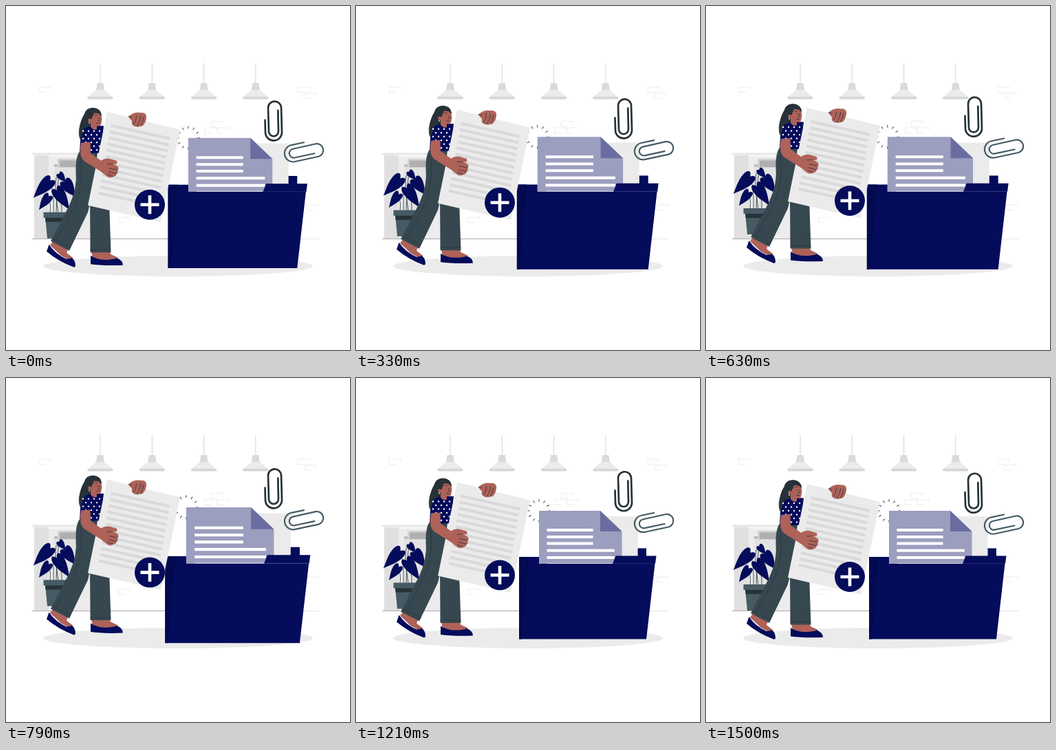
Animation, 500 px wide and 500 px high, one loop 1540 ms. Source, as an HTML page:

```html
<!DOCTYPE html>
<html lang="en">
<head>
<meta charset="utf-8">
<title>Adding a file to a folder</title>
<style>
  html, body { margin: 0; width: 100%; height: 100%; overflow: hidden; background: #fff; }
  svg { display: block; width: 100vw; height: 100vh; }
  .navy { fill: #040c5b; }
  .skin { fill: #ae6258; }
  .slate { fill: #37474f; }
  .dark { fill: #263238; }
  .pot { fill: #455a64; }
  .line { fill: none; stroke-linecap: round; stroke-linejoin: round; }
</style>
</head>
<body>
<svg viewBox="0 0 500 500">
  <g id="bricks" class="line" stroke="#e9e9e9" stroke-width=".8"></g>
  <g id="lamps"></g>

  <g id="shelf">
    <path d="M41 217H122V338H41z" fill="#ececec"/>
    <path d="M41 217H62V338H41z" fill="#e0e0e0"/>
    <path d="M38 213.5H124V216.500H38z" fill="#e6e6e6"/>
    <path d="M62 217H122V219H62z" fill="#f7f7f7"/>
    <path d="M75 222H104V236H75z" fill="#d2d2d2"/>
    <path d="M78 224.500H104V234H78z" fill="#b0b0b0"/>
    <path d="M70 230H75V234H70z" fill="#bdbdbd"/>
    <path d="M70 235H104V300H70z" fill="#e2e2e2"/>
  </g>
  <path d="M38 338.500H240" stroke="#939393" stroke-width=".8"/>
  <path d="M240 338.500H455" stroke="#e0e0e0" stroke-width=".8"/>
  <ellipse cx="250" cy="378" rx="196" ry="15" fill="#ebebeb"/>

  <g class="float">
    <path class="line" stroke="#263238" stroke-width=".8" d="M69 301Q70 270 64 253M73 301Q74 265 77 246M76 301Q70 262 73 250Q80 246 87 257M64 301Q66 286 61 279M81 301Q82 282 75 272"/>
    <g id="leaves" class="navy"></g>
    <path class="pot" d="M57 307H87L84 338H60z"/>
    <path class="dark" d="M57 307H87L86.500 314H57.600z"/>
    <path class="pot" d="M54.500 300H89V308H54.500z"/>
  </g>

  <g id="folder">
    <g id="rays" class="line" stroke="#263238" stroke-width=".9"></g>
    <path d="M364 201H409.500V262H364z" fill="#ebebeb"/>
    <path class="navy" d="M237 260H266V270H434.500L422 379.500H237z"/>
    <path d="M237 260H251L241 379.500H237z" fill="#030a50"/>
    <path d="M266 193H355L386.500 223V270H266z" fill="#9c9ebf"/>
    <path d="M355 193L386.500 223H355z" fill="#696d9f"/>
    <path d="M277.500 221H344.500M277.500 231H344.500M277.500 240.500H344.500M277.500 250.700H375.700M277.500 261H375.700" stroke="#fff" stroke-width="3.9"/>
    <path d="M278 269.500H373" stroke="#d8d9e8" stroke-width="1"/>
    <path class="navy" d="M377.500 258.500H409.500V247.500H422V258.500H436.500L435 270H373z"/>
    <path d="M373 269.700H435" stroke="#343b80" stroke-width=".6"/>
  </g>

  <g class="float">
    <!-- legs and shoes -->
    <path class="skin" d="M124 357H151L152 361L163 366L152 371L126 367z"/>
    <path class="navy" d="M123 363Q133 370 149 369Q158 368 161 366.500Q170 370 170 377Q140 378 123 375.500z"/>
    <path class="skin" d="M70 340L64 348L80 363L95 371L97 366L88 359L90 354z"/>
    <path class="navy" d="M62.500 347Q72 361 88 368Q93 367 96 366.500Q101 370 101 378.500L99 380Q76 371.500 59 357z"/>
    <path class="slate" d="M122 280L150 285L152.500 358.500H122.500z"/>
    <path class="slate" d="M106 213H133L130 240Q126 272 119 300L92 356L65 342L92 290Q104 264 101.500 240Q101 222 106 213z"/>
    <path class="line" stroke="#263238" stroke-width=".6" d="M67 338L94 351M122.500 354.500H152M108 222Q115 265 92 306L72 341"/>

    <!-- torso and head -->
    <path class="dark" d="M113.500 158Q116 148 126.500 148Q138 149 139 159L128 179L115 179Q112 187 109 196Q104.500 188 107.500 174Q109 165 113.500 158z"/>
    <path class="line" stroke="#263238" stroke-width=".8" d="M111 165Q102 184 109 196"/>
    <path class="navy" d="M114 178L124 174L142 174.500L138 214H107L108 196L111 186z"/>
    <g id="dots" fill="#fff"></g>
    <path class="skin" d="M123 167V176Q128 182 132 179V172z"/>
    <path class="skin" d="M126 154Q136 154 138.500 159L139.500 165L138 173Q135 176 131 174Q124 172 122.500 169Q118 169 119.500 165Q122 162 124 165Q123 157 126 154z"/>
    <path class="dark" d="M119.500 162Q118 150 127 149Q137 149 139 159Q132 155 128 156Q126 161 124 165z"/>
    <path class="line" stroke="#263238" stroke-width=".8" d="M129 158.500L132.500 159M136 159L138 158.500M131 162.200V162.700M136.500 162V162.500M134.500 163L136 167H134M131.500 170.500Q134 170 136 170.500"/>
    <circle cx="121" cy="170" r=".9" fill="#fff"/>

    <!-- sheet of paper -->
    <path d="M147 154L253 180L225 314.500L119 290z" fill="#ebebeb"/>
    <g id="text" stroke="#d9d9d9" stroke-width="4"></g>
    <circle class="navy" cx="209" cy="289" r="22"/>
    <path d="M195.500 289H222.500M209 275.500V302.500" stroke="#fff" stroke-width="4.600"/>

    <!-- hands -->
    <path class="skin" d="M178 161Q183 156 190 155L200 155.500Q205 157.500 204 163Q203 170 199.500 173.500Q197 176 195 174.500Q192 177.500 189.500 175Q186 176.500 184.500 173Q182 172 183 167Q180 165 178 161z"/>
    <path class="skin" d="M109 199L122.500 198L123 214L138 225Q144 221 150 222L160.500 225Q163 228 160 230L155 229.500Q162 232 163.500 235Q164 238 162 239Q164 243 160.500 244.500Q160 248 156 248Q153 251 148 249L138 241L114 226Q107 220 108 208z"/>
    <path class="line" stroke="#263238" stroke-width=".8" d="M189.500 160Q189 169 184.500 173M195.500 160.500Q195 169 189.500 175M200 162Q199 170 195 174.500M178 161L183 162M147 230L155 229.500M150 236L162 238.500M149 241L160.500 244M148 245L156 248"/>
  </g>

  <g class="float line" stroke-width="2.700">
    <path stroke="#263238" d="M376.500 166L377 184A12 12 0 0 0 401 183.500L400 148A9.500 9.500 0 0 0 381 148.500L382 182.500A7 7 0 0 0 396 182.500L395.300 152"/>
    <path stroke="#455a64" stroke-width="2.200" d="M433 198.500L415 202.300A12.300 12.300 0 0 0 419.500 226.500L454.500 219A9.500 9.500 0 0 0 450.500 200.500L417 208A6.400 6.400 0 0 0 419.500 220.700L448.500 214.500"/>
  </g>
</svg>
<script>
const $ = id => document.getElementById(id);
const fill = (id, items, draw) => { $(id).innerHTML = items.map(draw).join(''); };
const range = n => [...Array(n).keys()];

fill('bricks', [[48, 118], [424, 118], [434, 126.500], [298, 167.500], [289, 177], [307, 177], [163, 307], [437, 289]],
  ([x, y]) => `<path d="M${x + 9} ${y + 7.500}H${x}V${y}H${x + 17}V${y + 3}"/>`);

fill('lamps', [137, 212.300, 287.600, 362.800], x => `<g transform="translate(${x})">
  <path d="M0 83V113" stroke="#d4d4d4"/>
  <path d="M-4.500 112H4.500L6 122.500H-6z" fill="#dadada"/>
  <path d="M-6 122H6L18.500 132.500H-18.500z" fill="#ebebeb"/>
  <rect x="-18.700" y="131.800" width="37.400" height="3.700" rx="1.700" fill="#d6d6d6"/></g>`);

// Heart-shaped leaves: notch x, y, direction, length, width
fill('leaves', [[64, 254, 134, 35, 18], [77.500, 244.500, 52, 15, 10], [86, 256, 56, 26, 17], [62, 277, 126, 24, 13], [74, 268, 57, 34, 17]],
  ([x, y, angle, length, width]) => `<path transform="translate(${x} ${y})rotate(${angle})scale(${length} ${width})"
    d="M0 0C-.22-.2-.18-.55.15-.52C.5-.48.8-.12 1 0C.8.12.5.48.15.52C-.18.55-.22.2 0 0"/>`);

fill('rays', range(12), i => `<path transform="translate(266 193)rotate(${i * 30})" d="M13.500 0H16.500"/>`);

fill('dots', range(24), i => {
  const row = i >> 2, x = 112 + (i % 4) * 8 + (row % 2) * 4, y = 182 + row * 5.500;
  return x > 137 ? '' : `<circle cx="${x}" cy="${y}" r="1.200"/>`;
});

fill('text', range(12), i => {
  const x = 152.500 - i * 1.600, y = 174 + i * 8.900;
  return `<path d="M${x} ${y}l85.500 19"/>`;
});

const LOOP = 1540, CYCLE = 1500, STEP = 1000 / 24, LEAD = 22;
const floats = document.querySelectorAll('.float');

// Piecewise-linear double beat: [phase, scale]
const beat = [[0, 1], [.1, 1.1], [.3, 1], [.4, 1], [.5, 1.1], [.6, 1], [1, 1]];
function beatScale(p) {
  const i = Math.max(1, beat.findIndex(([at]) => at >= p));
  const [p0, s0] = beat[i - 1], [p1, s1] = beat[i];
  return s0 + (s1 - s0) * (p - p0) / (p1 - p0);
}

function render(now) {
  const tick = Math.floor((now % LOOP + 5) / STEP);
  const p = Math.min(1, (tick * STEP + LEAD) / CYCLE);
  const lift = -7 * (1 - Math.abs(2 * p - 1));
  floats.forEach(g => g.setAttribute('transform', `translate(0 ${lift})`));
  $('folder').setAttribute('transform', `translate(336.500 278.500)scale(${beatScale(p)})translate(-336.500 -278.500)`);
}

let start;
function loop(now) {
  start ??= now;
  render(now - start);
  requestAnimationFrame(loop);
}
render(0);
requestAnimationFrame(loop);
</script>
</body>
</html>
```
